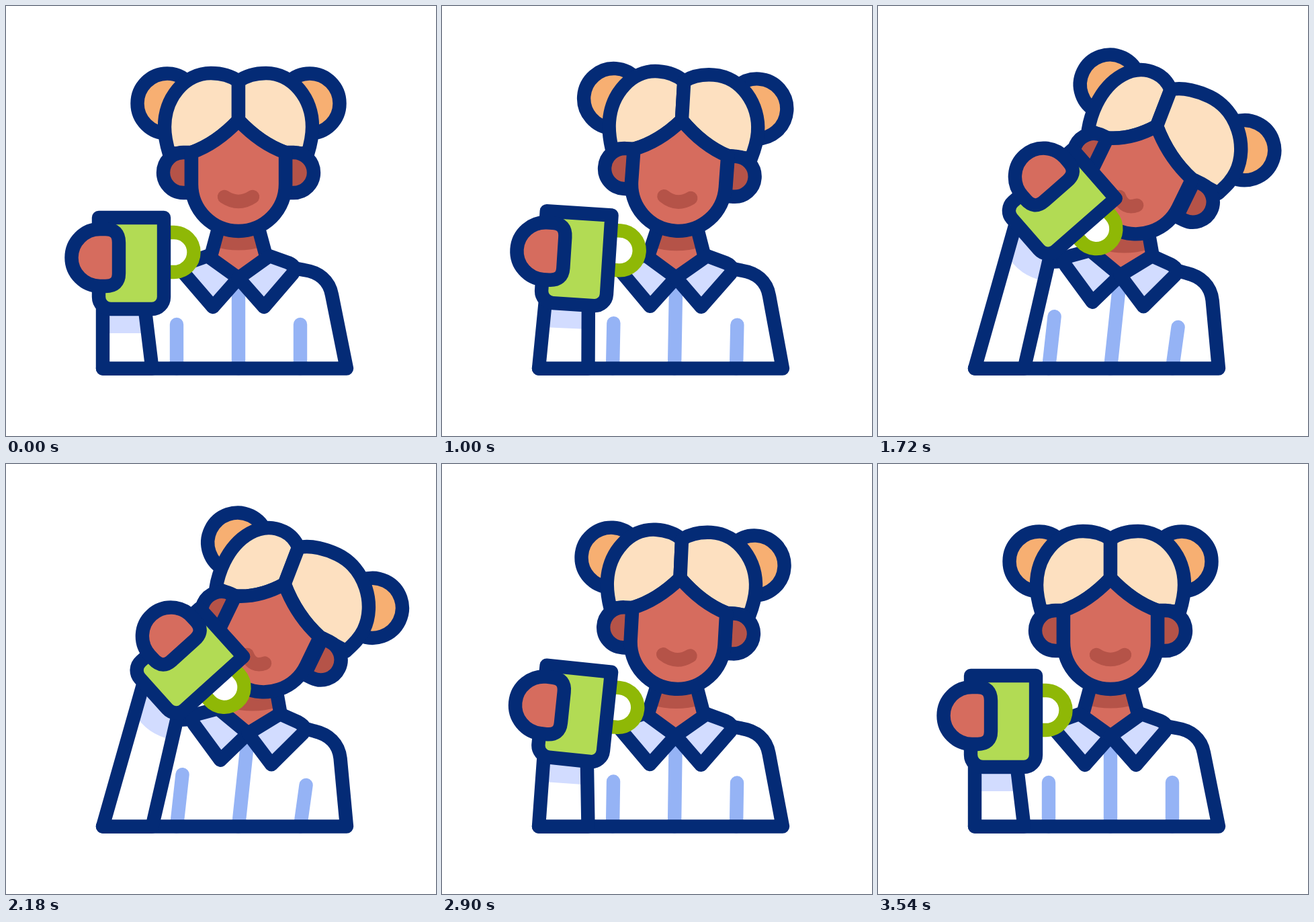
Write an HTML page that moves like this. It is 640 px wide and 640 px high and loops after 3.6 s.

```html
<!DOCTYPE html>
<html>
<head>
<meta charset="utf-8">
<style>
html, body { margin: 0; width: 100%; height: 100%; overflow: hidden; background: #fff; }
svg { display: block; width: 100vw; height: 100vh; stroke-linejoin: round; stroke-linecap: round; stroke-width: 20.4; }
</style>
</head>
<body>
<svg id="stage" viewBox="0 0 640 640"></svg>
<script>
const LOOP = 3600, HEM = 539.5;
const NAVY = '#042b76', SKIN = '#d66c5e', SHADE = '#b55348', HAIR = '#fde0c0', BUN = '#f7af72',
      CUP = '#b2db54', HANDLE = '#8fb806', PALE = '#d2dcff', STRIPE = '#95b3f5';

const path = (d, fill = 'none', stroke = NAVY) => `<path d="${d}" fill="${fill}" stroke="${stroke}"/>`;
const circle = (x, y, r, fill) => `<circle cx="${x}" cy="${y}" r="${r}" fill="${fill}" stroke="${NAVY}"/>`;
const group = (transform, content) => `<g transform="${transform}">${content}</g>`;

// cubic-bezier(x1, 0, x2, 1) running from start for duration ms
function ease(t, start, duration, x1, x2) {
  const x = Math.min(1, Math.max(0, (t - start) / duration));
  let lo = 0, hi = 1;
  for (let i = 0; i < 30; i++) {
    const s = (lo + hi) / 2, r = 1 - s;
    if (3 * r * r * s * x1 + 3 * r * s * s * x2 + s ** 3 < x) lo = s; else hi = s;
  }
  return lo * lo * (3 - 2 * lo);
}

function body(p) {
  // the shirt leans while its hem stays put
  const at = (x, y) => {
    const u = HEM - y;
    return [x + p * (0.155 * u - 0.00036 * u * u), y + p * 0.087 * (x - 392) * Math.min(1, u / 66)];
  };
  const collar = side => {
    const c = (x, y) => at(346 + side * x, y);
    return path(`M${c(46, 372)} L${c(74, 382)} Q${c(88, 388)} ${c(81, 398)} L${c(38, 448)} L${c(0, 405)}Z`, PALE);
  };
  const neckTop = x => [x + 26 * p, 335 + 4 * p];
  const left = at(305, 372), right = at(387 + 6 * p, 372);
  return path(`M${at(254, 474)} L254,${HEM} M${at(438, 474)} L438,${HEM} M${at(346, 415)} L346,${HEM}`, 'none', STRIPE)
    + path(`M${neckTop(315)} L${left} L${at(346, 405)} L${right} L${neckTop(377)}`, SKIN, 'none')
    + group(`translate(${21 * p} ${4 * p})`, path('M314,330 H378 L383,358 Q346,369 309,358Z', SHADE, 'none'))
    + path(`M${neckTop(315)} L${left} M${neckTop(377)} L${right}`)
    + path(`M${at(262, 391)} L${at(248, 393)}`)
    + path(`M144,${HEM} H507 L${at(485, 430)} C${at(481, 408)} ${at(465, 396)} ${at(444, 393)} L${at(428, 390)}`)
    + collar(-1) + collar(1);
}

function head(p) {
  const x = (base, shift) => base + shift * p;
  const top = `${x(346, -27)},112`, brow = `${x(346, -22)},170`;
  const templeL = `${x(276, -10)},218`, templeR = `${x(416, -10)},218`;
  const fringeL = `${x(313, -14)},205`, fringeR = `${x(379, -18)},205`;
  const lift = 4 * p;
  const hair =
    path(`M${brow} L${top} C${x(335, -25)},104 ${x(320, -19)},100 ${x(305, -16)},100
      C${x(265, -14)},100 ${x(236, -7)},138 ${x(236, -7)},180 C${x(236, -7)},195 ${x(239, -8)},207 ${x(243, -8)},220
      L${templeL} Q${fringeL} ${brow}Z`, HAIR)
    + path(`M${brow} L${top} C${x(357, -23)},${104 - lift} ${x(372, -14)},${100 - lift} ${x(387, -11)},${100 - lift}
      C${x(427, -5)},${100 - lift} ${x(456, 4)},138 ${x(456, 4)},180 C${x(456, 4)},195 ${x(453, 2)},207 ${x(449, 1)},220
      L${templeR} Q${fringeR} ${brow}Z`, HAIR);
  const ears = group(`translate(${-6 * p} 0)`,
    path('M276,218 H264 a30,30 0 0 0 0,60 H276Z M416,218 H428 a30,30 0 0 1 0,60 H416Z', SHADE));
  const face = path(`M${brow} Q${fringeL} ${templeL} v47 a70,70 0 0 0 140,0 v-47 Q${fringeR} ${brow}Z`, SKIN);
  const mouth = group(`translate(0 ${5 * p})`,
    path(`M${x(325, -5)},284 Q${x(346, -11)},298 ${x(367, -18)},284`, 'none', SHADE));
  return group(`rotate(${26.05 * p} 346 370) translate(0 ${-2.1 * p})`,
    circle(x(240, -5.5), 145, 44.5, BUN) + circle(x(452, 5.5), 145, 44.5, BUN) + hair + ears + face + mouth);
}

function arm(p, g) {
  const left = [144 + 62 * p, 450 - 128 * g];
  const right = [206 + 52 * p ** 0.8, 445 - 80 * g];
  const along = (foot, end, y) => [foot + (end[0] - foot) * (HEM - y) / (HEM - end[1]), y];
  const cuffL = along(144, left, 487 - 116 * g), cuffR = along(217.5, right, 487 - 77 * g);
  const bend = [(cuffL[0] + cuffR[0]) / 2 - 10 * g ** 4, (cuffL[1] + cuffR[1]) / 2 + 12 * g ** 4];
  return path(`M144,${HEM} L${left} L${right} L217.5,${HEM}Z`, '#fff', 'none')
    + path(`M${cuffL} L${left} L${right} L${cuffR} Q${bend} ${cuffL}`, PALE, 'none')
    + path(`M${left} L144,${HEM} H217.5 L${right}`);
}

function cup(p, g) {
  return group(`translate(${83 * p} ${-88.4 * g}) rotate(${48.3 * g} 186 385)`,
    path('M235,337 h15 a29.5,29.5 0 0 1 0,59 h-15', '#fff', HANDLE)
    + path('M138,315 H235 V433 a18,18 0 0 1 -18,18 H156 a18,18 0 0 1 -18,-18Z', CUP)
    + path('M140,332 H148 Q168,332 168,352 V398 Q168,417 148,417 H140 A42.5,42.5 0 0 1 140,332Z', SKIN));
}

const stage = document.getElementById('stage');
function draw(now) {
  const t = now % LOOP;
  const back = 1.018 * (1 - ease(t, 1812, 1785, 0.883, 0.08));
  const p = back * ease(t, 289, 1785, 0.883, 0.08);  // lean and sideways travel
  const g = back * ease(t, 500, 1400, 1, 0.06);      // lift and tilt of the cup
  stage.innerHTML = body(p) + head(p) + arm(p, g) + cup(p, g);
}

const begin = performance.now();
function tick() {
  draw(performance.now() - begin);
  requestAnimationFrame(tick);
}
tick();
</script>
</body>
</html>
```
